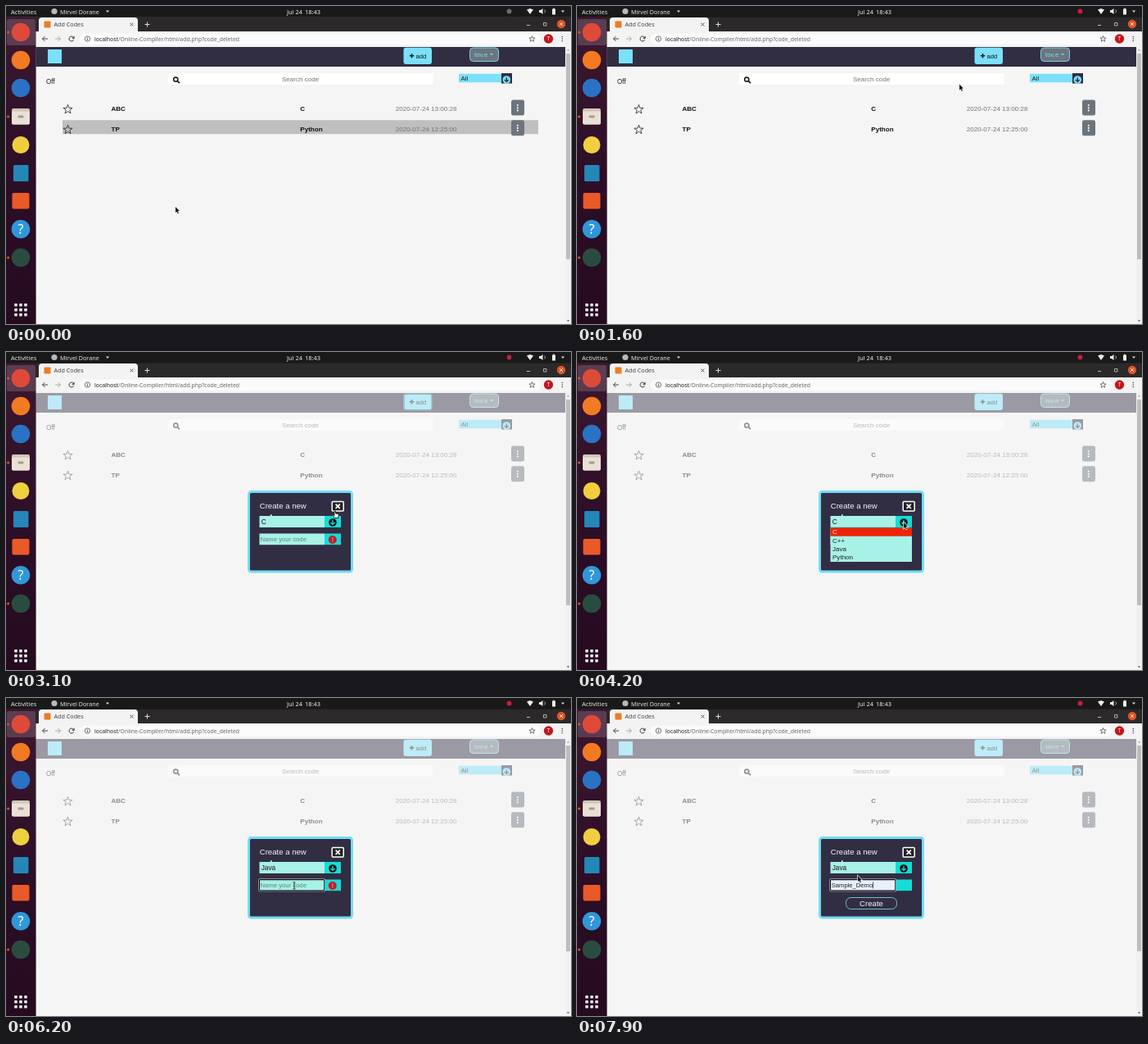
Recreate the animation shown at these times as an HTML page with a canvas. Size 690 by 388 pixels, loop 8000 ms.

```html
<!DOCTYPE html>
<html lang="en">
<head>
<meta charset="utf-8">
<title>Add Codes</title>
<style>
html, body { margin: 0; width: 100%; height: 100%; overflow: hidden; background: #f5f5f5; }
canvas { display: block; width: 690px; height: 388px; }
</style>
</head>
<body>
<canvas id="stage"></canvas>
<script>
const W = 690, H = 388, LOOP = 8000, STEP = 100;
const canvas = document.getElementById('stage');
const ctx = canvas.getContext('2d');
const dpr = window.devicePixelRatio || 1;
canvas.width = W * dpr;
canvas.height = H * dpr;

const UI = '"Noto Sans", "Open Sans", sans-serif';
const PAGE = '"Liberation Sans", Arial, sans-serif';
const CYAN = '#7be0fb', NAVY = '#312e43', TEAL = '#14ddd6', MINT = '#a8f1e7';

// moments of the interaction, in ms
const OPEN = 2000, LIST = 3900, PICK = 5500, FOCUS = 6000, SUGGEST = 6300, FILL = 7500;

// pointer path: time, x, y
const PATH = [
  [0, 207, 245], [300, 225, 230], [1000, 393, 147], [1200, 432, 127], [1400, 432, 127],
  [1800, 502, 64], [2200, 504, 61], [2600, 504, 61], [3100, 402, 194], [3500, 399, 207],
  [4200, 399, 208], [4800, 380, 241], [5100, 380, 243], [5200, 380, 244], [5500, 379, 241],
  [5900, 352, 229], [6600, 352, 229], [7000, 349, 247], [7400, 349, 247], [7900, 343, 217]
];

function pointer(t) {
  let i = 0;
  while (i < PATH.length - 2 && PATH[i + 1][0] <= t) i++;
  const [t0, x0, y0] = PATH[i], [t1, x1, y1] = PATH[i + 1];
  const k = Math.min(1, (t - t0) / (t1 - t0));
  return { x: x0 + (x1 - x0) * k, y: y0 + (y1 - y0) * k };
}

const inside = (p, x, y, w, h) => p.x >= x && p.x < x + w && p.y >= y && p.y < y + h;

function box(x, y, w, h, fill, r = 0, stroke, lw = 1) {
  ctx.beginPath();
  ctx.roundRect(x, y, w, h, r);
  if (fill) { ctx.fillStyle = fill; ctx.fill(); }
  if (stroke) { ctx.strokeStyle = stroke; ctx.lineWidth = lw; ctx.stroke(); }
}

function disc(x, y, r, fill) {
  ctx.beginPath();
  ctx.arc(x, y, r, 0, 7);
  ctx.fillStyle = fill;
  ctx.fill();
}

function ring(x, y, r, color, lw, a = 0, b = 7) {
  ctx.beginPath();
  ctx.arc(x, y, r, a, b);
  ctx.strokeStyle = color;
  ctx.lineWidth = lw;
  ctx.stroke();
}

function line(color, lw, ...pts) {
  ctx.beginPath();
  for (let i = 0; i < pts.length; i += 2) ctx.lineTo(pts[i], pts[i + 1]);
  ctx.strokeStyle = color;
  ctx.lineWidth = lw;
  ctx.stroke();
}

function poly(fill, ...pts) {
  ctx.beginPath();
  for (let i = 0; i < pts.length; i += 2) ctx.lineTo(pts[i], pts[i + 1]);
  ctx.closePath();
  ctx.fillStyle = fill;
  ctx.fill();
}

function text(s, x, y, size, color, font = PAGE, weight = 400, align = 'left') {
  ctx.font = `${weight} ${size}px ${font}`;
  ctx.textAlign = align;
  ctx.fillStyle = color;
  ctx.fillText(s, x, y);
}

const caret = (x, y, color, s = 2) => poly(color, x - s, y - s / 2, x + s, y - s / 2, x, y + s / 2 + 0.5);

function cross(x, y, r, color, lw) {
  line(color, lw, x - r, y - r, x + r, y + r);
  line(color, lw, x + r, y - r, x - r, y + r);
}

function downArrow(x, y, r, back, front) {
  disc(x, y, r, back);
  line(front, 1.4, x, y - r * 0.55, x, y + r * 0.45);
  line(front, 1.4, x - r * 0.52, y, x, y + r * 0.5, x + r * 0.52, y);
}

function star(x, y, r) {
  ctx.beginPath();
  for (let i = 0; i < 10; i++) {
    const a = i * Math.PI / 5 - Math.PI / 2, k = i % 2 ? r * 0.4 : r;
    ctx.lineTo(x + k * Math.cos(a), y + k * Math.sin(a));
  }
  ctx.closePath();
  ctx.stroke();
}

function topBar(t) {
  box(0, 0, W, 13.5, '#1a1919');
  text('Activities', 6, 9.5, 7.5, '#e4e4e4', UI);
  disc(59, 6.5, 3.6, '#b9b9b9');
  text('Mirvel Dorane', 66, 9.5, 7.2, '#e4e4e4', UI);
  caret(124, 6.5, '#dcdcdc');
  text('Jul 24', 343, 9.5, 7.4, '#eee', UI);
  text('18:43', 384, 9.5, 7.4, '#eee', UI, 400, 'right');
  disc(614.5, 6.5, 2.9, t < 100 ? '#77686c' : '#c41f3f');
  poly('#eee', 636, 4.5, 640, 3, 644, 4.5, 640, 10);
  poly('#eee', 651, 5, 653, 5, 655.5, 3, 655.5, 10, 653, 8, 651, 8);
  ring(656, 6.5, 2.5, '#ccc', 0.8, -0.9, 0.9);
  box(667, 3.5, 4, 7, '#eee', 0.5);
  box(668, 2.8, 2, 1, '#eee');
  caret(680, 6.5, '#dcdcdc');
}

function browser() {
  box(36, 13.5, 654, 17.5, '#2b2929');
  box(40, 14, 121, 18, '#f3f3f3', [4, 4, 0, 0]);
  box(46.5, 18.5, 8, 8, '#ee7d22', 1);
  text('Add Codes', 58.5, 25, 7.2, '#444', UI);
  cross(153.5, 22.5, 1.9, '#444', 0.9);
  line('#ddd', 1, 172.5, 19.5, 172.5, 25.5);
  line('#ddd', 1, 169.5, 22.5, 175.5, 22.5);
  line('#ccc', 0.9, 636, 23.5, 640, 23.5);
  box(656.5, 20.5, 3.5, 3.5, null, 0, '#ccc', 0.8);
  disc(678, 22, 5.2, '#df5326');
  cross(678, 22, 1.8, '#fff', 0.9);

  box(36, 31, 654, 19, '#f3f3f3');
  box(90, 33.5, 563, 13.5, '#fbfbfb', 6.7);
  line('#444', 1, 51, 40, 44.5, 40);
  line('#444', 1, 47.5, 37, 44.5, 40, 47.5, 43);
  line('#aaa', 1, 60, 40, 66.5, 40);
  line('#aaa', 1, 63.5, 37, 66.5, 40, 63.5, 43);
  ring(80, 40, 3, '#444', 1, 0.4, 5.6);
  poly('#444', 83.6, 36.5, 83.6, 40, 80.2, 39.8);
  ring(99.5, 40, 3.2, '#555', 0.8);
  line('#555', 0.9, 99.5, 39.4, 99.5, 42);
  line('#555', 0.9, 99.5, 37.8, 99.5, 38.6);
  const host = 'localhost';
  text(host, 108, 42.5, 6.86, '#222', UI);
  const w = ctx.measureText(host).width;
  text('/Online-Compiler/html/add.php?code_deleted', 108 + w, 42.5, 6.86, '#666', UI);
  ctx.strokeStyle = '#555';
  ctx.lineWidth = 0.8;
  star(642.5, 40.2, 3.8);
  disc(662.5, 40, 5.7, '#c4161c');
  text('T', 662.5, 42.3, 6.2, '#fff', UI, 400, 'center');
  for (const d of [-2.5, 0, 2.5]) disc(679.3, 40 + d, 0.8, '#444');
}

function dock() {
  const g = ctx.createLinearGradient(0, 13, 0, H);
  g.addColorStop(0, '#3c1830');
  g.addColorStop(0.5, '#2d0f27');
  g.addColorStop(1, '#250a20');
  box(0, 13.5, 36.5, H, g);
  box(1, 16, 35, 32, 'rgba(255,255,255,.16)', 2);
  disc(18, 32, 11.3, '#dd4a3a');
  disc(18, 66, 11.3, '#f27a22');
  disc(18, 100, 11.3, '#2a72c4');
  box(7, 125, 22, 19.5, '#d0c5b6', 2);
  box(7, 128.5, 22, 16, '#e9e1d6', 2);
  box(14.5, 133.5, 7, 3, '#a79c8d', 1);
  disc(18, 169.5, 10.5, '#f0cf3f');
  box(9, 194, 18.5, 20, '#2586b8', 1.5);
  box(7.5, 228, 21, 19.5, '#e95a28', 2);
  disc(18, 272.3, 11.3, '#3097d9');
  text('?', 18, 278.3, 16, '#fff', UI, 400, 'center');
  disc(18, 307, 11.3, '#2a4c40');
  for (const y of [32, 135, 307]) disc(2.6, y, 1.5, '#e5532a');
  for (let i = 0; i < 9; i++) box(10.2 + i % 3 * 6, 363 + Math.floor(i / 3) * 6, 3.6, 3.6, '#f1eef0', 0.8);
}

function addButton(hover, focus) {
  if (hover) {
    box(485.5, 51.3, 35, 19.5, '#6c757d', 3, '#c9c9d0', 1);
  } else {
    box(485.5, 50.8, 34.5, 20.2, CYAN, 3);
    if (focus) box(486, 51.3, 34, 19.4, null, 2.5, '#2a7288', 1.4);
  }
  const c = hover ? CYAN : '#151515';
  line(c, 1.5, 495.5, 58, 495.5, 63.4);
  line(c, 1.5, 492.8, 60.7, 498.2, 60.7);
  text('add', 500.4, 63.5, 7.7, c);
}

function row(y, name, lang, date, hover) {
  if (hover) box(69, y - 10.5, 581, 17, '#bfbfbf');
  ctx.strokeStyle = '#222';
  ctx.lineWidth = 0.8;
  star(75.5, y + 1.3, 5.9);
  text(name, 128.5, y + 3.3, 8.05, '#111', PAGE, 700);
  text(lang, 359.3, y + 3.3, 8.05, '#111', PAGE, 700);
  text(date, 475.7, y + 3.3, 8.05, '#6c757d');
  box(617, y - 10.5, 16, 19, '#6c757d', 2.5);
  for (const d of [-3.2, 0, 3.2]) disc(624.8, y - 0.8 + d, 1.05, '#fff');
}

function page(t, p) {
  const open = t >= OPEN;
  box(36.5, 50, 646.5, H - 50, '#f5f5f5');
  box(36.5, 50, 646.5, 24, NAVY);
  box(51, 53, 17, 17, CYAN);
  addButton(t < 2900 && inside(p, 485, 51, 36, 20), open && t < LIST);
  box(566.5, 51, 35, 16.5, '#6c757d', 4, CYAN, 0.9);
  text('tov.e', 572, 61.5, 7.8, CYAN);
  caret(593, 58.8, CYAN, 1.8);

  text('Off', 49, 94.5, 8.2, '#222');
  box(198, 82, 323.5, 14, '#fff');
  ring(207.3, 89.5, 2.6, '#111', 1.5);
  line('#111', 1.7, 209.3, 91.5, 212, 94.2);
  text('Search code', 337, 91.7, 8.05, '#757575');
  box(553, 82.7, 52, 10.5, CYAN);
  text('All', 555.5, 91, 8, '#222');
  box(605, 82, 13, 12.5, NAVY);
  downArrow(611.3, 90, 4.8, CYAN, NAVY);

  row(125, 'ABC', 'C', '2020-07-24 13:00:28', !open && p.y < 139 && p.y > 113);
  row(149.7, 'TP', 'Python', '2020-07-24 12:25:00', !open && p.y >= 139);

  if (open) box(36.5, 50, 646.5, H - 50, 'rgba(245,245,245,.54)');
  box(683, 50, 7, H - 50, '#f1f1f1');
  box(684, 58, 5, 251, '#bdbdbd');
  caret(686.5, 53.5, '#555', -1.6);
  caret(686.5, 384, '#555', 1.6);
}

function optionList(p) {
  box(309.5, 214.3, 99.5, 41.7, MINT);
  ['C', 'C++', 'Java', 'Python'].forEach((s, i) => {
    const y = 214.3 + i * 10.4;
    const on = p.y < 214.3 ? i === 0 : p.y >= y && p.y < y + 10.4;
    if (on) box(309.5, y, 99.5, 10.4, '#ee2406');
    text(s, 312, y + 7.8, 8.05, on ? '#c9eee5' : '#222');
  });
  line('#3c7672', 0.7, 309.5, 214.3, 409, 214.3);
}

function suggestions(p) {
  ctx.save();
  ctx.shadowColor = 'rgba(0,0,0,.45)';
  ctx.shadowBlur = 3;
  ctx.shadowOffsetY = 1;
  box(309.5, 236.8, 97.3, 80, '#fbfbfb', 1);
  ctx.restore();
  ['Sample_Demo', 'TP', 'TP2', 'ABC'].forEach((s, i) => {
    const y = 240 + i * 18.2;
    if (p.y >= y && p.y < y + 18.2) box(309.5, y, 97.3, 18.2, '#dcdcdc');
    text(s, 316, y + 12.2, 8, '#222', UI, 500);
  });
}

function dialog(t, p) {
  const filled = t >= FILL, focused = t >= FOCUS;
  const listed = t >= LIST && t < PICK, hinted = t >= SUGGEST && !filled;
  const preview = hinted && p.y >= 240;

  box(296.5, 170.5, 126, 97.5, NAVY, 3, '#72dcf8', 2.9);
  text('Create a new', 309.7, 191, 9.6, '#f4f4f4');
  box(323, 198.2, 1.6, 1.8, '#f4f4f4');
  box(398.2, 182.4, 14, 11.6, '#222', 1, '#fff', 1.5);
  cross(405.2, 188.2, 2.6, '#fff', 1.7);

  box(309.5, 200, 79.5, 14, MINT);
  box(389, 200, 20, 14, TEAL);
  text(t >= PICK ? 'Java' : 'C', 311.7, 209.8, 8.3, '#111');
  downArrow(399, 208, 4.8, '#111', TEAL);

  box(309.5, 221.5, 79.5, 13.7, preview || filled ? '#e8f0fe' : MINT);
  box(389, 221.5, 20, 13.7, TEAL);
  if (focused) {
    box(308.8, 220.9, 80.7, 14.9, null, 1, '#fff', 0.7);
    box(309.5, 221.6, 79.3, 13.5, null, 1, '#111', 1.1);
  }
  if (filled) {
    text('Sample_Demo', 310.7, 231.2, 7.65, '#222');
    if (t >= 7700) line('#111', 0.7, 361.6, 224.5, 361.6, 232.5);
    box(328.5, 243.5, 62, 14, NAVY, 6, '#79b9d0', 1);
    text('Create', 359.5, 254.2, 9.6, '#f4f4f4', PAGE, 400, 'center');
  } else {
    if (preview) text('Sample_Demo', 310.7, 231, 6.8, '#222');
    else text('Name your code', 310.5, 231.2, 7.7, '#62807e');
    disc(398.8, 229, 5, '#d9101d');
    text('!', 398.8, 232, 8.5, TEAL, PAGE, 700, 'center');
  }
  if (listed) optionList(p);
  if (hinted) suggestions(p);
}

function arrow(x, y) {
  ctx.beginPath();
  for (const [dx, dy] of [[0, 0], [0, 7.2], [1.6, 5.7], [2.8, 8.4], [3.9, 7.9], [2.8, 5.3], [4.9, 5.1]])
    ctx.lineTo(x + dx, y + dy);
  ctx.closePath();
  ctx.strokeStyle = 'rgba(255,255,255,.9)';
  ctx.lineWidth = 1.4;
  ctx.stroke();
  ctx.fillStyle = '#161616';
  ctx.fill();
}

function hand(x, y) {
  ctx.beginPath();
  for (const [dx, dy] of [[-1, 0], [0.4, 0], [0.6, 3], [3.8, 3.7], [4.3, 4.6], [3.7, 8.6], [-0.6, 8.6], [-3, 5.4], [-2.4, 4.5], [-1, 5.7]])
    ctx.lineTo(x + dx, y + dy);
  ctx.closePath();
  ctx.fillStyle = '#fff';
  ctx.fill();
  ctx.strokeStyle = '#1a1a1a';
  ctx.lineWidth = 0.9;
  ctx.stroke();
}

function beam(x, y) {
  line('#222', 0.8, x, y - 4, x, y + 4);
  line('#222', 0.8, x - 1.6, y - 4, x + 1.6, y - 4);
  line('#222', 0.8, x - 1.6, y + 4, x + 1.6, y + 4);
}

function drawPointer(t, p) {
  const open = t >= OPEN;
  const overInput = open && !(t >= LIST && t < PICK) && inside(p, 309.5, 221.5, 79.5, 13.7);
  if (inside(p, 485, 51, 36, 20) || (open && inside(p, 397, 181, 16, 15))) hand(p.x, p.y);
  else if (overInput) beam(p.x, p.y);
  else arrow(p.x, p.y);
}

function draw(t) {
  const p = pointer(t);
  ctx.setTransform(dpr, 0, 0, dpr, 0, 0);
  page(t, p);
  browser();
  topBar(t);
  dock();
  if (t >= OPEN) dialog(t, p);
  drawPointer(t, p);
}

const start = performance.now();
function tick(now) {
  const t = Math.max(0, now - start) % LOOP;
  draw(Math.floor(t / STEP) * STEP);
  requestAnimationFrame(tick);
}
draw(0);
requestAnimationFrame(tick);
</script>
</body>
</html>
```
